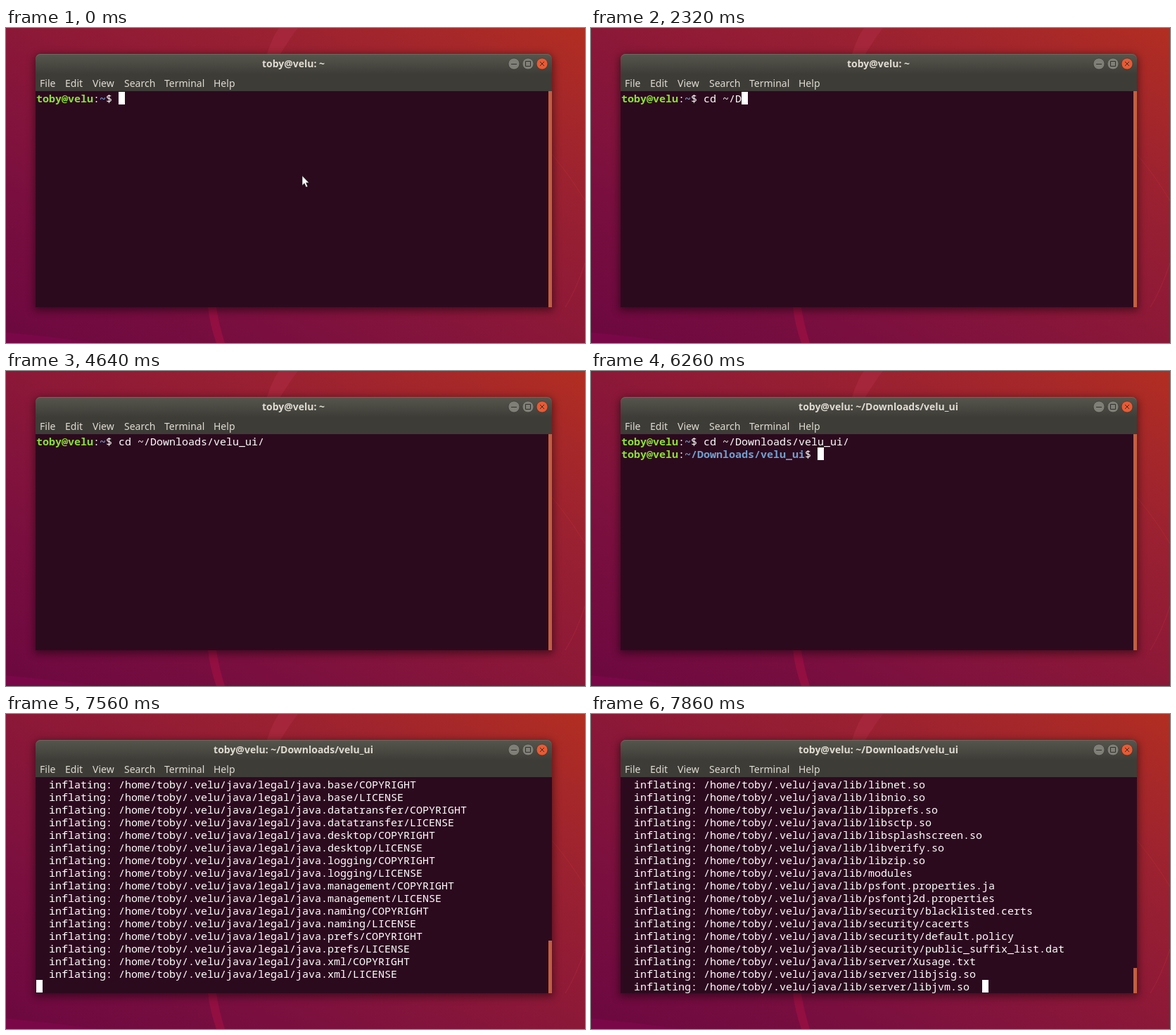
Recreate the animation shown at these times as an HTML page. Size 823 px wide and 449 px high, loop 8000 ms.

```html
<!DOCTYPE html>
<html lang="en">
<head>
<meta charset="utf-8">
<title>Terminal</title>
<style>
html, body { margin: 0; width: 100%; height: 100%; overflow: hidden; }
body {
  position: relative;
  background: linear-gradient(to top right, #6c0840 0%, #7a0f3f 25%, #8c1838 50%, #9c2230 75%, #b22e22 100%);
}
svg, #win, #win * { position: absolute; }
svg { left: 0; top: 0; }
#win {
  left: 42px; top: 37px; width: 734px; height: 361px;
  border-radius: 7px 7px 0 0; background: #2c0a1e;
  box-shadow: 0 3px 12px 2px rgba(0, 0, 0, .45);
}
#bar {
  width: 734px; height: 53px; border-radius: 7px 7px 0 0;
  background: linear-gradient(#57564d, #3d3c37 29px);
  box-shadow: inset 0 1px #6a695f;
  font: 14px/20px "Noto Sans", "Open Sans", sans-serif; color: #dfdbd2;
}
#title { left: 0; width: 733px; top: 4px; text-align: center; font-weight: 700; }
#bar span { top: 32px; }
#win pre {
  left: 1px; top: 54px; margin: 0; color: #fff;
  font: 500 15px/18px "Noto Sans Mono", monospace;
}
#win pre * { position: static; font-style: normal; }
pre b { color: #8ae234; font-weight: 700; }
pre i { color: #729fcf; font-weight: 700; }
pre u { display: inline-block; width: 9px; height: 18px; background: #fff; vertical-align: top; }
#thumb { right: 0; bottom: 0; width: 5px; background: #c35f41; }
</style>
</head>
<body>
<svg width="823" height="449">
  <path d="M388 0h27Q404 14 390 37H371Q378 14 388 0" fill="#a5263a"/>
  <path d="M287 398h12Q303 424 311 449H299Q290 424 287 398" fill="#930f41"/>
  <path d="M0 434Q65 440 130 449H0z" fill="#7a0848"/>
  <path d="M776 180Q802 211 823 246M795 398Q811 372 823 335" fill="none" stroke="#c83a3a" opacity=".3"/>
</svg>
<div id="win">
  <div id="bar">
    <div id="title"></div>
    <span style="left:6px">File</span>
    <span style="left:42px">Edit</span>
    <span style="left:81px">View</span>
    <span style="left:126px">Search</span>
    <span style="left:183px">Terminal</span>
    <span style="left:253px">Help</span>
  </div>
  <pre id="text"></pre>
  <div id="thumb"></div>
</div>
<svg width="823" height="449">
  <g stroke="#31302c">
    <g stroke-width=".6">
      <circle cx="722" cy="51" r="8" fill="#807f77"/>
      <circle cx="742" cy="51" r="8" fill="#807f77"/>
      <circle cx="762" cy="51" r="8" fill="#ea5a33"/>
    </g>
    <path d="M718 51.5h8M738.5 47.5h7v7h-7zM759 48l6 6M765 48l-6 6" fill="none"/>
  </g>
  <path id="arrow" d="M421 210.5v14l3.2-3 2.3 5.4 2.4-1-2.3-5.2h4.2z" fill="#fff" stroke="#111" stroke-width=".6"/>
  <path id="beam" d="M420 204.5h5M420 218.5h5M422.5 204.5v14" fill="none" stroke="#fff"/>
</svg>
<script>
const $ = id => document.getElementById(id);
const user = 'toby', host = 'velu', dir = `~/Downloads/${host}_ui`;
const prompt = path => `<b>${user}@${host}</b>:<i>${path}</i>$ `;

const home = prompt('~');
const cd = home + `cd ${dir}/\n` + prompt(dir);
const run = cd + `./${host}_ui.sh \n`;
const located = run + `Located script directory: /home/${user}/Downloads/${host}_ui\n`;

const libs = ('jexec jli/libjli.so jrt-fs.jar jvm.cfg libawt.so libawt_headless.so libawt_xawt.so ' +
  'libfontmanager.so libjava.so libjavajpeg.so libjawt.so libjimage.so libjsig.so libjsound.so ' +
  'liblcms.so libmanagement.so libmanagement_ext.so libmlib_image.so libnet.so libnio.so ' +
  'libprefs.so libsctp.so libsplashscreen.so libverify.so libzip.so modules psfont.properties.ja ' +
  'psfontj2d.properties security/blacklisted.certs security/cacerts security/default.policy ' +
  'security/public_suffix_list.dat server/Xusage.txt server/libjsig.so server/libjvm.so')
  .split(' ').map(f => 'lib/' + f);
const legal = 'base datatransfer desktop logging management naming prefs xml'.split(' ')
  .flatMap(m => ['COPYRIGHT', 'LICENSE'].map(f => `legal/java.${m}/${f}`));
const inflate = files => files.map(f => `  inflating: /home/${user}/.${host}/java/${f}`).join('\n');

// [start ms, text, cursor shown, total lines in the scrollback]
const steps = [
  [0, home, 1], [260, home, 0], [560, home, 1],
  ...[[600, 1], [680, 2], [860, 3], [1680, 4], [1900, 5], [2320, 6], [2460, 7], [2600, 8], [2840, 15]]
    .map(([t, n]) => [t, home + `cd ${dir}/`.slice(0, n), 1]),
  [3520, home + 'cd ~/Downloads/', 0],
  [3760, home + 'cd ~/Downloads/', 1],
  [3800, home + 'cd ~/Downloads/' + host[0], 1],
  [4000, home + `cd ${dir}/`, 1],
  [4640, home + `cd ${dir}/`, 0],
  [4860, home + `cd ${dir}/`, 1],
  [4900, cd, 1], [5560, cd, 0], [6260, cd, 1],
  [6320, cd + '.', 1], [6420, cd + './', 1], [6560, cd + './' + host[0], 1],
  [6740, cd + `./${host}_ui.sh `, 1],
  [7440, run, 1], [7520, located, 1],
  [7560, inflate(legal) + '\n', 1, 70],
  [7580, inflate(libs.slice(0, 16)) + '\n', 1, 131],
  [7620, inflate(libs.slice(9, 26)) + '  ', 1, 138],
  [7840, inflate(libs.slice(13, 30)) + '  ', 1, 142],
  [7860, inflate(libs.slice(18)) + '  ', 1, 146]
];

let shown;
function draw(now) {
  const t = now % 8000;
  const step = steps.findLast(s => s[0] <= t);
  if (step !== shown) {
    const [, text, cursor, lines = 17] = shown = step;
    $('text').innerHTML = text + (cursor ? '<u></u>' : '');
    $('thumb').style.height = Math.round(308 * 17 / lines) + 'px';
  }
  $('title').textContent = `${user}@${host}: ${t < 4900 ? '~' : dir}`;
  $('arrow').style.display = t < 40 ? '' : 'none';
  $('beam').style.display = t >= 40 && t < 560 ? '' : 'none';
}

const start = performance.now();
function tick() {
  draw(performance.now() - start);
  requestAnimationFrame(tick);
}
tick();
</script>
</body>
</html>
```
